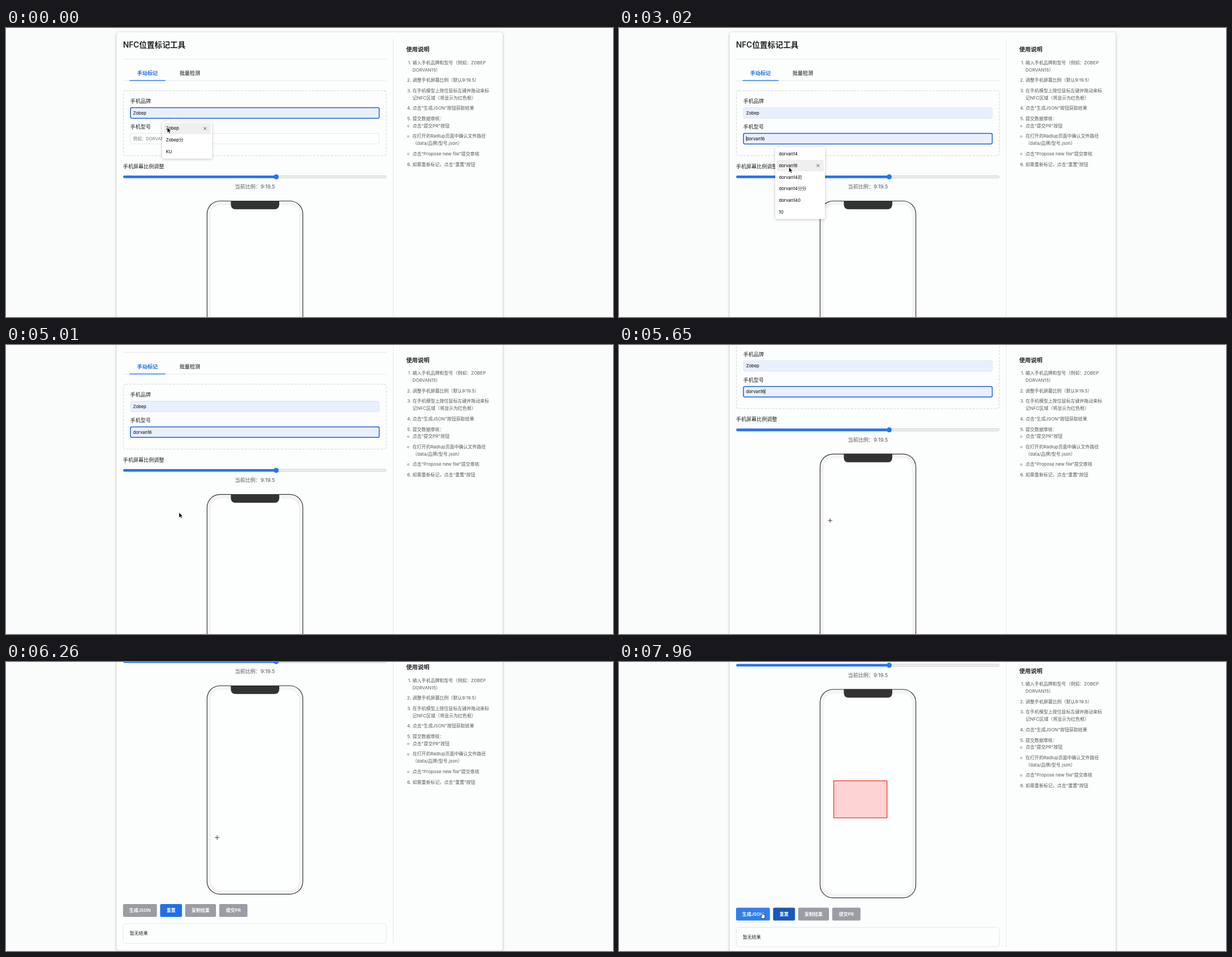
These frames come from a looping animation (1084x517 px, 7990 ms). An HTML page:

```html
<!DOCTYPE html>
<html lang="zh-CN">
<head>
<meta charset="utf-8">
<style>
html, body { margin: 0; width: 100%; height: 100%; overflow: hidden; background: #fafcfb; }
svg { display: block; font-family: Inter, "Noto Sans CJK SC", "Noto Sans CJK", sans-serif; }
.card { filter: drop-shadow(0 1px 2px rgba(0, 0, 0, .3)); }
.pop { filter: drop-shadow(0 1px 2.5px rgba(0, 0, 0, .24)); }
.rule { stroke: #dadce0; stroke-width: .7; }
</style>
</head>
<body>
<svg width="1084" height="517" viewBox="0 0 1084 517">
  <g id="page"></g>
  <g id="side"></g>
  <g id="popup"></g>
  <rect id="area" fill="#ff0000" fill-opacity=".17" stroke="#f02810" stroke-width="1.2"/>
  <g id="cursor"></g>
</svg>
<script>
const LOOP = 7990, STEP = 30;
const BLUE = '#1f70e8', GREY = '#9a9ea4', INK = '#202124', SOFT = '#55585c';
const $ = id => document.getElementById(id);

// Text is placed by its left (or anchored) edge and vertical centre.
const text = (x, y, s, size = 8.05, fill = SOFT, weight = 400, anchor = 'start', id = '') =>
  `<text ${id && `id="${id}"`} x="${x}" y="${y + size * .36}" font-size="${size}" fill="${fill}" font-weight="${weight}" text-anchor="${anchor}">${s}</text>`;
const rect = (x, y, w, h, r, attrs) =>
  `<rect x="${x}" y="${y}" width="${w}" height="${h}" rx="${r}" ${attrs}/>`;
const line = (x1, y1, x2, y2) => `<path class="rule" d="M${x1} ${y1}L${x2} ${y2}"/>`;
const input = (y, label, id) => text(222, y, label, 9.2, INK) +
  rect(222.3, y + 11.6, 444.2, 18.8, 2.3, `id="${id}" fill="#e8f0fe"`);

function buttonRow(left, items) {
  return items.map(([id, label, w, fill]) => {
    const x = left;
    left += w + 5.75;
    return rect(x, 700, w, 23, 2.3, `id="${id}" fill="${fill}"`) +
      text(x + w / 2, 711.5, label, 8.05, '#fff', 600, 'middle');
  }).join('');
}

$('page').innerHTML =
  rect(197.5, 7.5, 689.5, 776, 4.6, 'class="card" fill="#fcfdfd"') +
  line(691.5, 19, 691.5, 770.5) +
  text(209, 30, 'NFC位置标记工具', 13.8, INK, 600) +
  line(209, 55.5, 679, 55.5) + line(209, 94.2, 679, 94.2) +
  text(252.7, 80.5, '手动标记', 9.2, BLUE, 600, 'middle') +
  text(328.3, 80.5, '批量检测', 9.2, SOFT, 600, 'middle') +
  rect(220.7, 93.2, 64, 1.3, 0, `fill="${BLUE}"`) +
  rect(209.6, 112.1, 469.6, 116.3, 4.6, 'fill="none" stroke="#d9dbde" stroke-width="1.2" stroke-dasharray="4 2.4"') +
  input(131, '手机品牌', 'brandBox') + input(177, '手机型号', 'modelBox') +
  text(227, 152, 'Zobep', 7.67, INK, 500) +
  text(227, 198, '', 7.67, INK, 500, 'start', 'model') +
  '<path id="caret" stroke="#111" stroke-width=".8"/>' +
  text(209, 247.3, '手机屏幕比例调整', 9.2, INK) +
  rect(209.5, 264.3, 469.4, 4, 2, 'fill="#efefef" stroke="#b4b4b4" stroke-width=".6"') +
  rect(209.3, 264, 273.7, 4.6, 2.3, 'id="fill"') +
  '<circle id="thumb" cx="482.5" cy="266.3" r="4.5"/>' +
  text(444.5, 283.7, '当前比例：9:19.5', 9.2, SOFT, 400, 'middle') +
  rect(359.1, 309.5, 171, 372.9, 23, 'fill="#f4f4f4" stroke="#333" stroke-width="1.2"') +
  rect(366, 317, 157, 358, 17, 'fill="#fdfefe"') +
  '<path d="M401.5 309H488V315.6Q488 324.3 479.3 324.3H410.2Q401.5 324.3 401.5 315.6Z" fill="#333"/>' +
  buttonRow(209, [['make', '生成JSON', 60.5, GREY], ['reset', '重置', 39, BLUE],
    ['copy', '复制结果', 55, GREY], ['send', '提交PR', 50.5, GREY]]) +
  rect(209.3, 735, 470, 35.3, 4.6, 'fill="none" stroke="#dadce0" stroke-width=".7"') +
  text(221, 752.5, '暂无结果', 8.05, INK);

// Each item is its marker and lines; '◦' items are nested.
function list(y, items) {
  return items.map(([mark, ...lines], i) => {
    const nested = mark === '◦', first = nested && items[i - 1][0] !== '◦';
    if (i && !first) y += 6;
    const bullet = nested
      ? `<circle cx="718.3" cy="${y + .5}" r="1.6" fill="none" stroke="${SOFT}" stroke-width=".6"/>`
      : text(723.5, y, mark, 8.05, SOFT, 400, 'end');
    return bullet + lines.map(s => text(726, (y += 12.7) - 12.7, s)).join('');
  }).join('');
}

$('side').innerHTML = text(714.7, 38.3, '使用说明', 10.35, INK, 600) + list(62, [
  ['1.', '输入手机品牌和型号（例如：ZOBEP', 'DORVAN15）'],
  ['2.', '调整手机屏幕比例（默认9:19.5）'],
  ['3.', '在手机模型上按住鼠标左键并拖动来标', '记NFC区域（将显示为红色框）'],
  ['4.', '点击"生成JSON"按钮获取结果'],
  ['5.', '提交数据审核：'],
  ['◦', '点击"提交PR"按钮'],
  ['◦', '在打开的Radlup页面中确认文件路径', '（data/品牌/型号.json）'],
  ['◦', '点击"Propose new file"提交审核'],
  ['6.', '如需重新标记，点击"重置"按钮']]);

const brands = ['Zobep', 'Zobep分', 'KU'];
const models = ['dorvan14', 'dorvan16', 'dorvan14的', 'dorvan14分分', 'dorvan140', '10'];
const ROW = 20.7;

function popup(items, top, hover) {
  const mid = i => top + 12.2 + i * ROW;
  return `<g class="pop" fill="#fff">${rect(279, top, 89, items.length * ROW + 4.2, 3.5, '')}
    <path d="M285 ${top + .5}l5-4 5 4z"/></g>` +
    (items[hover] ? rect(281.7, mid(hover) - 10.2, 84, 20.4, 2, 'fill="#efefef"') +
      `<path d="M353 ${mid(hover) - 2.5}l5 5m0-5l-5 5" stroke="#333" stroke-width=".9"/>` : '') +
    items.map((s, i) => text(285.5, mid(i), s, 7.67, INK, 500)).join('');
}

const cursors = {
  arrow: '<path d="M0 0V9.4L2.2 7.4 3.7 10.8 5.3 10.1 3.9 6.9H6.8Z" fill="#000" stroke="#fff" stroke-width=".7"/>',
  beam: '<path d="M-2-5Q0-5 0-3.5V3.5Q0 5-2 5M2-5Q0-5 0-3.5M0 3.5Q0 5 2 5" fill="none" stroke="#222" stroke-width=".8"/>',
  cross: '<path d="M-4 0H4M0-4V4" stroke="#222" stroke-width=".9"/>',
  hand: '<path d="M-1.6-4.3Q-.8-5.3 0-4.3L.6-1.4Q1.6-2 2.2-1.1 3.2-1.5 3.6-.6 4.6-.7 4.7.5L4.4 3.6 3.4 6H-.6L-3.3 2.3Q-3.7 1-2.4 1.2L-1 2.2Z" fill="#fff" stroke="#111" stroke-width=".8"/>'
};

// Ease-out progress between two times.
function ease(t, from, to) {
  const u = Math.min(1, Math.max(0, (t - from) / (to - from)));
  return 1 - (1 - u) ** 2;
}

const scroll = t => 64 * ease(t, 4925, 5130) + 203 * ease(t, 5577, 6050) - 6.5 * ease(t, 6300, 6580);

const DRAG = [6850, 7310], CORNER = [383.5, 212.5];
// Pointer moves: start, end, and where it goes.
const moves = [
  [90, 400, 289, 198], [850, 1170, 290, 231], [1470, 2180, 298, 260], [2330, 2630, 300, 291],
  [2810, 3000, 303.5, 249], [3320, 3830, 305, 263], [4160, 4810, 309, 299.5],
  [5280, 5450, 377, 314], [6260, 6580, ...CORNER], [...DRAG, 478.6, 278.8], [7540, 7960, 256, 453]];

const pointAt = t => moves.reduce(([x, y], [from, to, tx, ty]) => {
  const u = ease(t, from, to);
  return [x + (tx - x) * u, y + (ty - y) * u];
}, [288, 178]);

function set(id, attrs) {
  for (const k in attrs) $(id).setAttribute(k, attrs[k]);
}

const border = focused => focused
  ? { stroke: '#1a5fc8', 'stroke-width': 1.5 }
  : { stroke: '#d4d8de', 'stroke-width': .6 };

function pointer(t, x, y) {
  if (t < 1100 && y > 188 && y < 207) return 'beam';
  if (t > 5280 && x > 366 && x < 523) return 'cross';
  return y > 439 && x < 314 ? 'hand' : 'arrow';
}

function draw(t) {
  const s = scroll(t), [x, y] = pointAt(t);
  const picked = t >= 3380, open = t >= 560 && !picked;
  const hover = open ? Math.floor((y - 215.2) / ROW) : -1;
  const value = picked ? models[1] : models[hover] || '';

  set('page', { transform: `translate(0 ${-s})` });
  // The guide sticks to the top until its column runs out.
  set('side', { transform: `translate(0 ${-Math.min(s, 11.5) - Math.max(0, s - 249.5)})` });

  set('brandBox', border(t < 500));
  set('modelBox', { ...border(t >= 500), fill: value ? '#e8f0fe' : '#fdfefe' });
  $('model').textContent = value || '例如：DORVAN15';
  set('model', { fill: value ? INK : '#777', 'font-weight': value ? 500 : 400 });

  const blink = t >= 560 && (t - (picked ? 3320 : 2810) + LOOP * 1000) % 1000 < 490 - (picked ? 0 : 10)
    && (picked || t > 1320);
  const caretX = picked ? 227.4 + $('model').getComputedTextLength() : 227.4;
  set('caret', { d: blink ? `M${caretX} 193V202.5` : '' });

  const onSlider = picked && s === 0 && y > 261 && y < 271;
  for (const id of ['fill', 'thumb']) set(id, { fill: onSlider ? '#1a5fd0' : '#2474f5' });

  $('popup').innerHTML = t < 150 ? popup(brands, 167.5, 0) : open ? popup(models, 213.3, hover) : '';

  const [endX, endY] = pointAt(Math.min(t, DRAG[1]));
  const [left, top] = CORNER;
  set('area', { x: left, y: top, width: Math.max(0, endX - left), height: Math.max(0, endY - top),
    display: t > DRAG[0] ? 'inline' : 'none' });
  const onMake = t > DRAG[1] && y > 439 && x < 270;
  set('make', { fill: onMake ? '#2f80ed' : t < DRAG[1] ? GREY : BLUE });
  set('reset', { fill: t > DRAG[1] && x < 314 ? '#1958b7' : BLUE });

  set('cursor', { transform: `translate(${x} ${y})` });
  $('cursor').innerHTML = cursors[pointer(t, x, y)];
}

const start = performance.now();
function tick(now) {
  const t = Math.max(0, now - start) % LOOP;
  draw(Math.floor(t / STEP) * STEP);
  requestAnimationFrame(tick);
}
draw(0);
requestAnimationFrame(tick);
</script>
</body>
</html>
```
